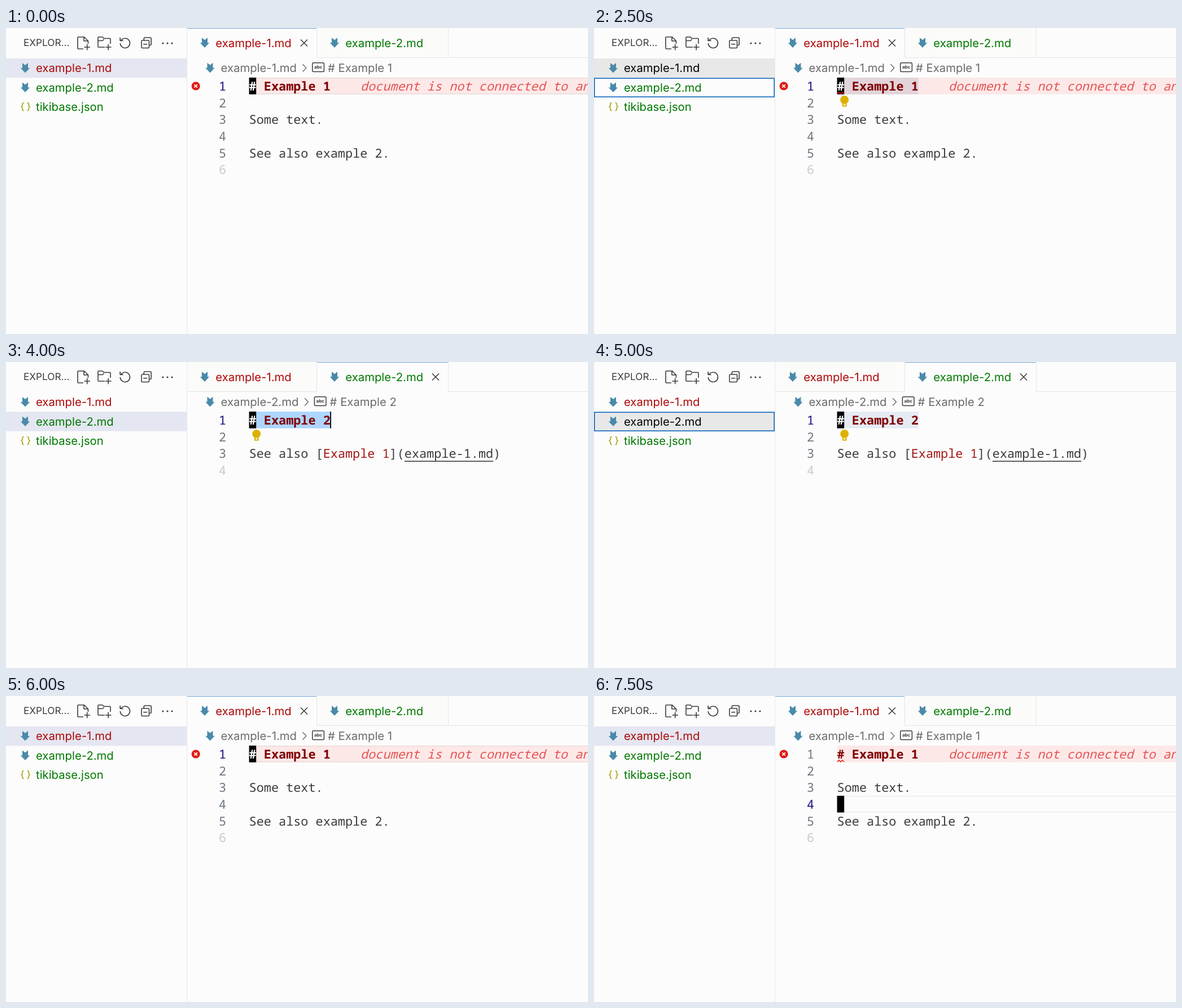
Write an HTML page with a canvas that moves like this. It is 1031x543 px and loops after 8000 ms.

```html
<!DOCTYPE html>
<html lang="en">
<head>
<meta charset="utf-8">
<title>Editor</title>
<style>
  html, body { margin: 0; width: 100%; height: 100%; overflow: hidden; background: #fcfcfc; }
  canvas { display: block; }
</style>
</head>
<body>
<canvas id="stage" width="1031" height="543"></canvas>
<script>
const W = 1031, H = 543, LOOP = 8000;
const ctx = document.getElementById('stage').getContext('2d');

const MONO = '21.85px "Noto Sans Mono", monospace';
const UI = '20.3px Inter, sans-serif';
const CHAR = 13.11, CODE_X = 430.6, LINE_TOP = 88, LINE_H = 29.67;
const ROW_TOP = 54, ROW_H = 34.4;
const BG = '#fcfcfc', INK = '#3b3b3b', RED = '#ad0707', GREEN = '#007800';
const BORDER = '#e5e5e5', BLUE = '#005fb8', MD = '#4a8aa9', HEADING = '#800000';

// at: start time, file: open file, line: cursor line,
// sel: heading selected, focus: focused explorer row
const steps = [
  { at: 0, file: 1, line: 1 },
  { at: 1000, file: 1, line: 1, sel: true },
  { at: 2000, file: 1, line: 1, sel: true, focus: 1 },
  { at: 2500, file: 1, line: 1, sel: true, focus: 2 },
  { at: 3000, file: 2, line: 1 },
  { at: 4000, file: 2, line: 1, sel: true },
  { at: 5000, file: 2, line: 1, sel: true, focus: 2 },
  { at: 5500, file: 2, line: 1, sel: true, focus: 1 },
  { at: 6000, file: 1, line: 1 },
  { at: 6500, file: 1, line: 2 },
  { at: 7000, file: 1, line: 3 },
  { at: 7500, file: 1, line: 4 }
];

const docs = {
  1: ['# Example 1', '', 'Some text.', '', 'See also example 2.', ''],
  2: ['# Example 2', '', 'See also [Example 1](example-1.md)', '']
};

const fileName = n => `example-${n}.md`;
const fileColor = n => n === 1 ? RED : GREEN;
const lineY = n => LINE_TOP + (n - 1) * LINE_H;
const colX = n => CODE_X + n * CHAR;

function rect(x, y, w, h, color) {
  ctx.fillStyle = color;
  ctx.fillRect(x, y, w, h);
}

function text(str, x, y, color, font = UI, align = 'left') {
  ctx.font = font;
  ctx.textAlign = align;
  ctx.fillStyle = color;
  ctx.fillText(str, x, y);
}

function line(d, color = INK, width = 1.6) {
  ctx.strokeStyle = color;
  ctx.lineWidth = width;
  ctx.stroke(new Path2D(d));
}

function dot(x, y, r, color) {
  ctx.fillStyle = color;
  ctx.beginPath();
  ctx.arc(x, y, r, 0, 7);
  ctx.fill();
}

function cross(x, y, r, color, width) {
  line(`M${x - r} ${y - r}l${2 * r} ${2 * r}m0 ${-2 * r}l${-2 * r} ${2 * r}`, color, width);
}

function arrowIcon(x, y) {
  ctx.fillStyle = MD;
  ctx.fill(new Path2D(`M${x - 5} ${y - 9}l5 4l5 -4v9h3.2l-8.2 8.6l-8.2 -8.6h3.2z`));
}

function toolbar() {
  text('EXPLOR…', 31, 32.4, INK, '17.2px Inter, sans-serif');
  line('M137 37H128Q127 37 127 36V17Q127 16 128 16H138.5L145.5 23V28M138 16V23H145.5M138.5 34H149M143.7 28.8V39.2');
  line('M175 34H164Q163 34 163 33V17Q163 16 164 16H171L173.5 18.5H184Q185 18.5 185 19.5V28M163 22.5H171L173.5 20M176 34H186.5M181.2 28.8V39.2');
  line('M202.3 27A8.6 8.6 0 1 0 206 19.8L203 22.3M202.2 17V22.5H207.7');
  line('M241.5 22H252Q253.5 22 253.5 23.5V34Q253.5 35.5 252 35.5H241.5Q240 35.5 240 34V23.5Q240 22 241.5 22ZM243.2 28.7H250.2M244.3 22V19Q244.3 17 246.3 17H255.2Q257.2 17 257.2 19V28.5Q257.2 30.5 255.2 30.5H253.5');
  [278, 286, 294].forEach(x => dot(x, 27, 1.6, INK));
}

function explorer(s) {
  toolbar();
  for (const n of [1, 2]) {
    const y = ROW_TOP + (n - 1) * ROW_H;
    const active = s.file === n;
    if (active) rect(0, y, 320, ROW_H, s.focus ? '#e8e8e8' : '#e4e6f1');
    if (s.focus === n) {
      ctx.strokeStyle = BLUE;
      ctx.lineWidth = 1.5;
      ctx.strokeRect(0.75, y + 0.75, 318.5, ROW_H - 1.2);
    }
    arrowIcon(34, y + 17);
    text(fileName(n), 53, y + 24.2, active && s.focus ? '#000' : fileColor(n));
  }
  const brace = '600 17px Inter, sans-serif';
  text('{', 25, 145, '#b7b03b', brace);
  text('}', 36.5, 145, '#b7b03b', brace);
  text('tikibase.json', 53, 147, GREEN);
  rect(320, 0, 1, H, '#e8e8e8');
}

function tabs(open) {
  const list = [
    { n: 1, x: 321, end: 550, close: 528 },
    { n: 2, x: 551, end: 783, close: 761 }
  ];
  rect(321, 52, W - 321, 1, BORDER);
  for (const { n, x, end, close } of list) {
    const active = n === open;
    rect(x, 0, end - x, active ? 53 : 52, active ? BG : '#fbfbfa');
    rect(end, 0, 1, 53, BORDER);
    if (active) {
      rect(x, 0, end - x, 1, '#6fa3d3');
      cross(close, 26.5, 6, INK, 1.6);
    }
    arrowIcon(x + 31, 26.3);
    text(fileName(n), x + 50.3, 34, fileColor(n));
  }
}

function breadcrumb(open) {
  const dx = open === 1 ? 0 : 3.6, grey = '#6a6a6a';
  arrowIcon(361.5, 70.8);
  text(fileName(open), 380.6, 78.2, grey);
  line(`M${525.5 + dx} 64.2l6.3 6.6l-6.3 6.6`, grey, 1.4);
  ctx.strokeStyle = INK;
  ctx.lineWidth = 1.5;
  ctx.beginPath();
  ctx.roundRect(542.8 + dx, 61.8, 20.6, 15.8, 2);
  ctx.stroke();
  text('abc', 553.1 + dx, 72.4, INK, 'bold 8px Inter, sans-serif', 'center');
  text(`# Example ${open}`, 570 + dx, 78.2, grey);
}

function code(str, col, n, color = INK, font = MONO) {
  text(str, colX(col), lineY(n) + 23, color, font);
}

function selection(s) {
  const fill = s.file === 1
    ? (s.focus ? '#e2d4da' : '#b5c3e6')
    : (s.focus ? '#e5ebf4' : '#add6ff');
  rect(CODE_X, LINE_TOP, 11 * CHAR, LINE_H, fill);
  if (!s.focus) rect(colX(11) - 0.6, LINE_TOP, 1.8, LINE_H, '#000');
}

function bulb() {
  const c = '#ddb100';
  dot(443.7, 127.4, 7.4, c);
  rect(440, 132, 7.6, 7.6, c);
  rect(442.3, 134.6, 3, 3, BG);
}

function squiggle() {
  line('M431 117l3 -3.2l3 3.2l3 -3.2l3 3.2', '#e51400', 1.4);
}

function errorLine() {
  rect(CODE_X, LINE_TOP, W, LINE_H, '#fde8e8');
  dot(336.2, 103, 7.6, '#e01b14');
  cross(336.2, 103, 2.7, '#fff', 1.8);
}

function editor(s) {
  const doc = docs[s.file], top = lineY(s.line);
  const bold = 'bold ' + MONO;
  if (s.file === 1) errorLine();
  if (s.sel) {
    selection(s);
  } else {
    const edge = s.line === 1 && s.file === 1 ? '#ecdcdc' : '#ebebeb';
    rect(CODE_X, top, W, 1.5, edge);
    rect(CODE_X, top + LINE_H - 1.5, W, 1.5, edge);
  }

  doc.forEach((str, i) => {
    const n = i + 1;
    const color = n === s.line ? '#171184' : n === doc.length ? '#c9c9c9' : '#6e7681';
    text(n, 390, lineY(n) + 23, color, MONO, 'right');
    code(str, 0, n, n === 1 ? HEADING : INK, n === 1 ? bold : MONO);
  });

  if (s.file === 1) {
    code('document is not connected to any other documents', 15.05, 1, '#e45454', 'italic ' + MONO);
  } else {
    rect(colX(10), lineY(3) + 1, 9 * CHAR, LINE_H - 2, BG);
    code('Example 1', 10, 3, '#a31515');
    rect(colX(21), lineY(3) + 28, 12 * CHAR, 1.6, INK);
  }

  rect(CODE_X, top, 12.6, LINE_H, '#000');
  code(doc[s.line - 1].charAt(0), 0, s.line, '#fff', s.line === 1 ? bold : MONO);
  if (s.file === 1 && (s.sel || s.line > 1)) squiggle();
  if (s.sel) bulb();
}

function draw(now) {
  const t = now % LOOP;
  const s = steps.findLast(step => step.at <= t);
  ctx.textRendering = 'geometricPrecision';
  ctx.lineJoin = 'round';
  rect(0, 0, W, H, BG);
  explorer(s);
  tabs(s.file);
  breadcrumb(s.file);
  editor(s);
}

const start = performance.now();
function tick() {
  draw(performance.now() - start);
  requestAnimationFrame(tick);
}
tick();
</script>
</body>
</html>
```
